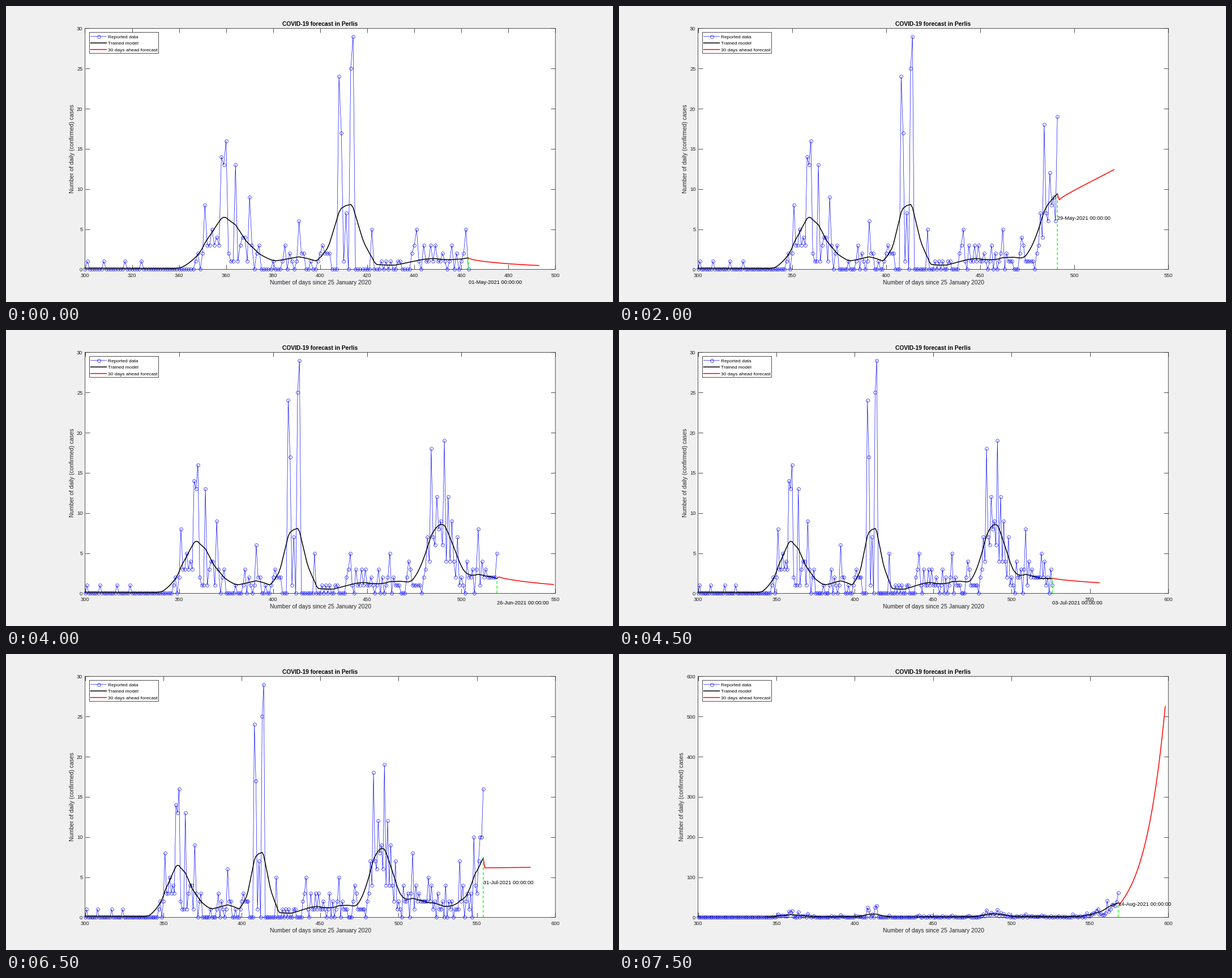
Write a matplotlib script that moves like this. It is 1072 by 522 pixels and loops after 8 s.

```python
import numpy as np
import matplotlib.pyplot as plt
from matplotlib.animation import FuncAnimation
from matplotlib.lines import Line2D
from matplotlib.patches import Rectangle

W, H, DPI = 1072, 522, 100
PX = 72 / DPI                      # points per pixel
START, FIRST, STEP, FRAMES = 300, 463, 7, 16
INK, BLUE, RED, GREEN = "#262626", "#0000ff", "#ff0000", "#00ff00"
FONT = 9.33 * PX
THIN, THICK = 0.65 * PX, 1.5 * PX

plt.rcParams["font.family"] = "Liberation Sans"
plt.rcParams["path.snap"] = False

# Usual number of cases at a few turning points (day: cases)
TREND = {300: 0.15, 346: 0.1, 350: 2.8, 370: 2.3, 376: 1, 398: 1.1, 404: 0.4,
         423: 0.1, 432: 0.5, 449: 1.6, 458: 0.7, 470: 1.6, 479: 1, 482: 6.5,
         490: 7.5, 497: 5, 500: 1.6, 512: 1.8, 524: 1.9, 534: 0.8, 550: 2.6,
         553: 12, 559: 7, 567: 45}
# Days that stand out of it
SPIKES = {351: 8, 358: 14, 359: 13, 360: 16, 364: 13, 370: 9, 391: 6, 408: 24,
          409: 17, 411: 7, 413: 25, 414: 29, 422: 5, 462: 5, 484: 18, 491: 19,
          493: 12, 509: 8, 539: 7, 548: 10, 554: 16, 555: 21, 561: 41, 568: 61}
# Where each week's forecast arrives after 30 days
OUTLOOK = [0.48, 1, 0.9, 9, 12.4, 5, 2.43, 1.7, 1.1, 1.32, 0.9, 1.5, 4, 6.22,
           17, 525]

all_days = np.arange(START, FIRST + STEP * (FRAMES - 1) + 1)
usual = np.interp(all_days, list(TREND), list(TREND.values()))
cases = np.random.default_rng(19).poisson(usual)
for day, count in SPIKES.items():
    usual[day - START] = cases[day - START] = count


def moving_mean(y, ahead, size=10):
    box = np.ones(size)
    part = slice(ahead, ahead + len(y))
    return np.convolve(y, box)[part] / np.convolve(np.ones(len(y)), box)[part]


def forecast(fit, end):
    """Restart from the level of three days ago, then drift to the outlook."""
    t = np.arange(31)
    value = fit[-4] * (end / fit[-4]) ** ((t - 1).clip(0) / 29) ** 0.8
    value[0] = fit[-1]
    return t, value


def stamp(week):
    day = 1 + STEP * week
    for month, length in (("May", 31), ("Jun", 30), ("Jul", 31), ("Aug", 31)):
        if day <= length:
            return f"{day:02d}-{month}-2021 00:00:00"
        day -= length


fig = plt.figure(figsize=(W / DPI, H / DPI), dpi=DPI, facecolor="#f0f0f0")
ax = fig.add_axes([139.5 / W, 57.6 / H, 830.7 / W, 425 / H])
ax.tick_params(direction="in", top=True, right=True, length=8.3 * PX,
               width=0.8 * PX, color=INK, labelcolor=INK, labelsize=FONT)
ax.tick_params(axis="x", pad=6.5 * PX)
ax.tick_params(axis="y", pad=4.2 * PX)
for spine in ax.spines.values():
    spine.set(linewidth=0.8 * PX, color=INK, zorder=1)


def label(x, y, s, size=FONT, color="black", **kw):
    return fig.text(x / W, 1 - y / H, s, fontsize=size, color=color,
                    va="baseline", **kw)


label(554.7, 34.6, "COVID-19 forecast in Perlis", FONT * 1.1, ha="center",
      weight="bold")
label(555, 491.2, "Number of days since 25 January 2020", FONT * 1.1, INK,
      ha="center")
y_title = label(119.5, 252, "Number of daily (confirmed) cases", FONT * 1.1,
                INK, ha="center", rotation=90, rotation_mode="anchor")

ring = dict(marker="o", ms=5.7 * PX, mfc="none", mec=BLUE, mew=THIN)
reported, = ax.plot([], [], color=BLUE, lw=THIN, clip_on=False, zorder=3, **ring)
model, = ax.plot([], [], color="black", lw=THICK, zorder=4)
future, = ax.plot([], [], color=RED, lw=THICK, zorder=5)
today, = ax.plot([], [], color=GREEN, lw=1.3 * PX, dashes=(3.8, 2.6), zorder=6)
date = ax.text(0, 0, "", fontsize=FONT, va="center_baseline", zorder=8)


def legend():
    def line(x, y, **kw):
        fig.add_artist(Line2D([v / W for v in x], [1 - y / H] * len(x),
                              zorder=11, **kw))

    fig.add_artist(Rectangle((147.5 / W, 1 - 83.5 / H), 122 / W, 37 / H,
                             fc="white", ec=INK, lw=0.8 * PX, zorder=10))
    rows = (("Reported data", BLUE, THIN), ("Trained model", "black", THICK),
            ("30 days ahead forecast", RED, THICK))
    for i, (name, color, lw) in enumerate(rows):
        y = 53.7 + 11.5 * i
        line((149.5, 177.5), y, color=color, lw=lw)
        label(180, y + 3.2, name, FONT * 0.9, zorder=11)
    line((163.5,), 53.7, ls="none", **ring)


legend()


def draw(week):
    last = FIRST + STEP * week
    n = last - START + 1
    fit = moving_mean(moving_mean(usual[:n], 4), 5)
    t, ahead = forecast(fit, OUTLOOK[week])

    x_max = 50 * -(-(last + 30) // 50)
    x_step = 20 if x_max == 500 else 50
    top = max(cases[:n].max(), ahead.max())
    y_step = 5 if top < 50 else 100
    y_max = y_step * int(np.ceil(top / y_step))
    ax.set_xticks(range(START, x_max + 1, x_step))
    ax.set_yticks(range(0, y_max + 1, y_step))
    ax.set_xlim(START, x_max)
    ax.set_ylim(0, y_max)
    y_title.set_x((114.5 if y_max >= 100 else 119.5) / W)

    reported.set_data(all_days[:n], cases[:n])
    model.set_data(all_days[:n], fit)
    future.set_data(last + t, ahead)
    today.set_data([last, last], [0, fit[-1]])
    date.set_position((last, fit[-1] - 3))
    date.set_text(stamp(week))
    return reported, model, future, today, date


anim = FuncAnimation(fig, draw, frames=FRAMES, interval=500, repeat=True,
                     repeat_delay=0, blit=False)
plt.show()
```
